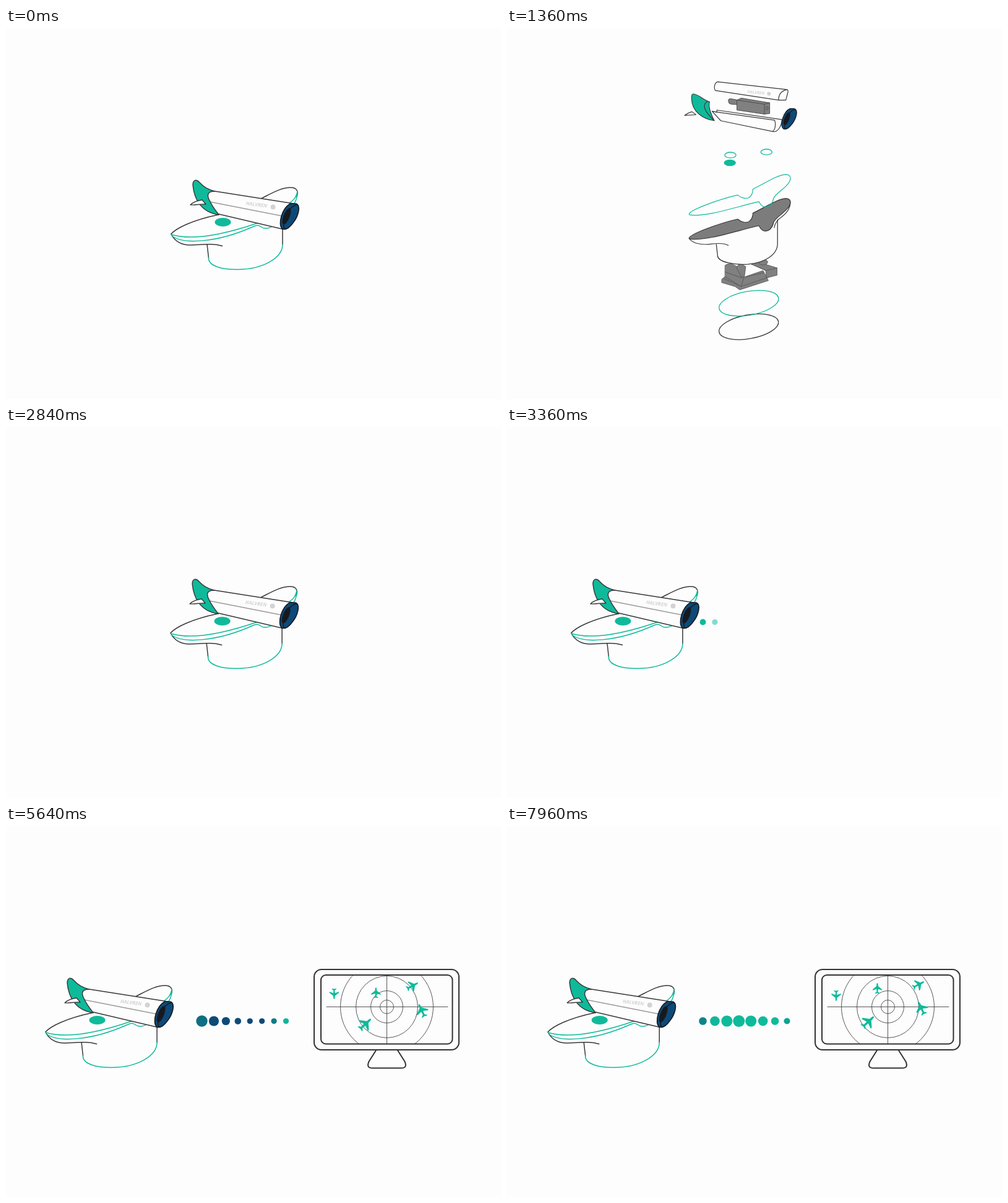
An HTML page with a canvas that plays this animation: 800 by 600 pixels, repeating every 8000 ms.

```html
<!DOCTYPE html>
<html lang="en">
<head>
<meta charset="utf-8">
<title>Exploded device and radar</title>
<style>
  html, body { margin: 0; width: 100%; height: 100%; overflow: hidden; background: #fdfdfd; }
  canvas { display: block; width: 100vw; height: 100vh; }
</style>
</head>
<body>
<canvas id="stage" width="800" height="600"></canvas>
<script>
const ctx = document.getElementById('stage').getContext('2d');
const LOOP = 8000, SMALL = 0.747;
const INK = '#38383a', TEAL = '#0fba9b', NAVY = '#0d4a78', GRAY = '#808080', WHITE = '#fdfdfd';
const TEAL_RGB = [15, 186, 155], NAVY_RGB = [13, 74, 120];

const clamp = v => Math.min(1, Math.max(0, v));
const lerp = (a, b, k) => a + (b - a) * k;
const mod = (v, n) => ((v % n) + n) % n;
const span = (t, start, length) => clamp((t - start) / length);
const ease = u => u < 0.5 ? 4 * u ** 3 : 1 - 4 * (1 - u) ** 3;
const smooth = u => u * u * (3 - 2 * u);
const mix = (a, b, k) => `rgb(${a.map((v, i) => Math.round(lerp(v, b[i], k))).join()})`;

function shape(d, fill, stroke, width = 1.1) {
  const path = typeof d === 'string' ? new Path2D(d) : d;
  if (fill) { ctx.fillStyle = fill; ctx.fill(path); }
  if (stroke) { ctx.strokeStyle = stroke; ctx.lineWidth = width; ctx.stroke(path); }
}

function oval(x, y, rx, ry = rx, turn = 0) {
  const path = new Path2D();
  path.ellipse(x, y, rx, ry, turn, 0, Math.PI * 2);
  return path;
}

function label(x, y, size, turn, markX, markY, markR) {
  ctx.save();
  ctx.translate(x, y);
  ctx.rotate(turn);
  ctx.font = `italic bold ${size}px "Open Sans", sans-serif`;
  ctx.fillStyle = '#d3d3d5';
  ctx.fillText('HALVREN', 0, 0);
  ctx.restore();
  shape(oval(markX, markY, markR), '#d3d3d5');
}

// Nose is drawn at full size; the other loose parts at the exploded size.
function nose() {
  shape('M447 325C438 318 447 289 460 284L468 284C478 286 472 305 464 315C459 322 453 327 447 325Z', NAVY, '#15181e', 1.6);
  shape('M469 286C457 289 445 313 450 325', null, '#15181e', 1.4);
  shape(oval(453.5, 304.5, 5, 14, 0.38), '#17191f');
}

function tail() {
  shape('M299 92C308 92 312 100 324 104C322 110 325 120 331 132C316 130 297 120 297 98C297 94 298 92 299 92Z', TEAL, INK);
  shape('M321 103C312 108 316 118 331 132', null, INK);
}

function wing() {
  shape('M284 126Q289 122 295 120.5L301 125Z', WHITE, INK);
}

function topShell() {
  shape('M343 69L445 80Q449 80 448 84L445 96L434 96L339 82C336 78 338 69 343 69Z', WHITE, INK);
  shape('M434 96C434 88 438 82 447 80', null, INK);
  label(387, 85.5, 6, 0.09, 419.5, 86.5, 2.9);
}

function bottomShell() {
  shape('M333 120L340 121L340 118L438 132C437 143 431 152 424 150L346 134Z', WHITE, INK);
  shape('M333 120L427 133C429 139 428 147 424 150', null, INK);
}

function motor() {
  shape('M375 100L364 98Q360 98 361 102Q361 105 364 106L375 107Z', GRAY, '#4a4a4a', 0.9);
  shape('M374 100L380 97L423 104L423 120L415 121L374 115Z', GRAY, '#4a4a4a', 0.9);
  shape('M374 100L415 106L423 104M415 106L415 121', null, '#4a4a4a', 0.9);
  shape(oval(419, 112, 1.7, 2.6), null, '#4a4a4a', 0.8);
}

const BRIM = 'M302 342C302 336 345 320 375 313C381 318 388 319 392 317C396 314 398 309 398 304' +
  'C415 296 434 283 447 282C458 282 455 292 449 298C443 305 432 311 429 318' +
  'C428 325 423 331 416 331C410 330 409 326 407 323C375 330 330 346 304 343Q302 343 302 342Z';

function hat(lid) {
  shape('M302 342C308 351 325 352 343 351L345 369C347 378 370 382 390 381C415 379 435 367 435 350' +
    'L435 314C447 307 455 298 454 286L400 304Z', WHITE);
  shape('M343 351L345 369C347 378 370 382 390 381C415 379 435 367 435 350L435 314', null, INK, 1.2);
  shape('M302 342C308 351 325 352 335 350.5C347 349 355 349 361 352.5', null, INK);
  shape('M454 286C455 295 450 303 441 310C435 314 431 319 430 326', null, INK);
  shape(BRIM, mix([253, 253, 253], [124, 124, 124], lid), INK);
}

function trim() {
  ctx.translate(0, -50);
  shape(BRIM, null, TEAL);
}

function electronics() {
  [
    'M351 422L357 417L381 420L413 409L421 424L378 438L371 433L351 427Z',
    'M356 401Q363 396 372 402L381 407L384 420L380 433L356 418Z',
    'M373 404L378 398L387 403L385 418L381 419Z',
    'M395 399L405 396L434 405L434 416L418 420L417 409Z'
  ].forEach(d => shape(d, GRAY, '#555', 0.8));
  shape('M356 411L381 420M380 433L421 419M354 421L378 432M395 399L417 409L434 405M386 419L414 412', null, '#555', 0.8);
  shape('M406 396C407 390 418 390 420 396C420 402 406 402 406 396Z', GRAY, '#555', 0.8);
}

const floorRing = (y, color) => () => shape(oval(391.5, y, 45.3, 17.9, -0.175), null, color, 1.2);
const ringDot = (x, y) => () => shape(oval(x, y, 8.5, 4.2), null, TEAL, 1.2);

// home: anchor when assembled, away: anchor when exploded, turn: tilt when assembled
const PARTS = [
  { home: [388.6, 365], away: [392, 517], draw: floorRing(517, INK) },
  { home: [388.6, 365], away: [391.5, 468], draw: floorRing(468, TEAL) },
  { home: [390, 342], away: [393, 415], draw: electronics },
  { home: [267, 334], away: [302, 342], draw: hat },
  { home: [267, 334], away: [302, 292], draw: trim },
  { home: [350.5, 314], away: [363, 190.5], draw: () => shape(oval(363, 190.5, 9, 4.9), TEAL) },
  { home: [350.5, 314], away: [364, 174.5], draw: ringDot(364, 174.5) },
  { home: [424, 302], away: [418, 171.5], draw: ringDot(418, 171.5) },
  { home: [344, 301], away: [346, 134], turn: 0.03, upper: true, draw: bottomShell },
  { home: [398, 292], away: [399, 110], turn: 0.04, upper: true, draw: motor },
  { home: [329, 281], away: [339, 82], turn: 0.048, upper: true, draw: topShell },
  { home: [307, 246], away: [300, 92], upper: true, draw: tail },
  { home: [298, 286], away: [284, 126], upper: true, draw: wing },
  { home: [459, 305], away: [456, 130.5], upper: true, fullSize: true, draw: nose }
];

function exploded(high, low) {
  const scale = lerp(1, SMALL, low);
  for (const { home, away, turn = 0, upper, fullSize, draw } of PARTS) {
    const k = upper ? high : low;
    const own = fullSize ? home : away;
    const size = fullSize ? scale : scale / SMALL;
    ctx.save();
    ctx.translate(lerp(home[0], away[0], low), lerp(home[1], away[1], k));
    ctx.rotate(turn * (1 - k));
    ctx.scale(size, size);
    ctx.translate(-own[0], -own[1]);
    draw(clamp(low * 5));
    ctx.restore();
  }
}

function assembled() {
  const w = 1.5;
  // cap
  shape('M267 333C275 324 300 311 343 302L414 275C430 267 445 258 460 258C470 258 473 264 470 273', null, INK, w);
  shape('M267 333C272 345 285 352 300 351C320 350 335 348 349.5 352.5', null, INK, w);
  shape('M325 350L327.5 372M447 350L447 322', null, INK, w);
  shape('M327.5 371C326 385 350 391 375 390.5C415 390 447 372 447 350', null, TEAL, w);
  shape('M267 334C300 344 350 335 408 315', null, TEAL, w);
  shape('M268 336C285 350 340 348 400 321C406 318 409 319 413 322C420 327 428 322 435 319', null, TEAL, w);
  shape('M471 264C469 275 464 279 458 283M471 268C470 276 468 281 465 285', null, TEAL, w);
  shape(oval(350.5, 314, 13, 7), TEAL);
  // fuselage
  shape('M338 264L465 284L446 325L344 301C335 292 326 280 326 270Q327 263 338 264Z', WHITE);
  shape('M329 281L446 304', null, '#9a9a9a', 1.3);
  shape('M336 263.7L465 284M344 301L446 325', null, INK, w);
  shape('M302 254C302 245 308 244 313 250C320 258 329 262 337 264C326 264 324 270 329 279' +
    'C333 288 340 297 344 302C314 298 304 275 302 254Z', TEAL, INK, w);
  shape('M298 286C303 281 310 279 317 278L323 285C315 284 306 287 298 286Z', WHITE, INK, 1.3);
  label(387.5, 286, 8, 0.13, 431.5, 289.5, 4);
  nose();
}

function device(t) {
  const back = t < 2340 ? 1 : 1 - ease(span(t, 2340, 360));
  const high = ease(span(t, 400, 1350)) * back;
  const low = ease(span(t, 520, 1360)) * back;
  const x = -203 * ease(span(t, 2740, 980)) + 2.2 * span(t, 7560, 400) ** 2;
  ctx.save();
  ctx.translate(x, 0);
  if (high < 0.003) assembled();
  else exploded(high, low);
  ctx.restore();
}

function signal(t) {
  const run = (t - 4560) * 0.00935;
  for (let i = 0; i < 8; i++) {
    const show = span(t, 3193 + 107 * i, 120);
    if (!show) continue;
    const far = Math.abs(mod(i - 7 - run + 8.95, 17.9) - 8.95);
    const r = 4.6 + (far < 5 ? 2.45 * (1 + Math.cos(Math.PI * far / 5)) : 0);
    // teal band, 7.5 dots wide, in a cycle of 13.9
    const off = Math.abs(mod(i + 0.25 - run + 6.95, 13.9) - 6.95);
    const navy = smooth(clamp((off - 3.75) / 2.4 + 0.5));
    ctx.globalAlpha = show;
    shape(oval(316.5 + 136 / 7 * i, 315.5, r), mix(TEAL_RGB, NAVY_RGB, navy));
  }
  ctx.globalAlpha = 1;
}

const PLANE = 'M0 -10C1.4 -10 1.6 -7 1.6 -4L9 2L9 4L1.6 1.5L1.2 6.5L4.2 9L4.2 10.2L0 9.3' +
  'L-4.2 10.2L-4.2 9L-1.2 6.5L-1.6 1.5L-9 4L-9 2L-1.6 -4C-1.6 -7 -1.4 -10 0 -10Z';

// x and y at 4560 ms, drift in px per second, heading in degrees, size
const PLANES = [
  [529.5, 270, 0.75, 1.3, 180, 0.85],
  [597.5, 273, 0.3, -3.1, 0, 0.85],
  [653, 259.5, 3.6, -0.9, 62, 1],
  [673, 300, -1, -1.6, -25, 1.1],
  [579.5, 322, 1.3, -1.6, 47, 1.2]
];

function roundBox(x, y, w, h, r) {
  const path = new Path2D();
  path.roundRect(x, y, w, h, r);
  return path;
}

function monitor(t) {
  const show = span(t, 3600, 300);
  if (!show) return;
  const screen = roundBox(509, 241, 212.5, 111.5, 8);
  ctx.save();
  ctx.globalAlpha = show;
  shape(roundBox(498, 232, 234, 130, 12), null, '#333', 2);
  shape('M598.5 362L586.5 381Q582 391.5 592 391.5L639 391.5Q649 391.5 644.5 381L632.5 362', null, '#333', 2);
  ctx.save();
  ctx.clip(screen);
  for (const r of [11, 26, 50, 75]) shape(oval(615.5, 292.5, r), null, '#444', 0.9);
  shape('M518 292.5H714M615.5 241V352', null, '#444', 0.9);
  for (const [x, y, vx, vy, heading, size] of PLANES) {
    const s = (t - 4560) / 1000;
    ctx.save();
    ctx.translate(x + vx * s, y + vy * s);
    ctx.rotate(heading * Math.PI / 180);
    ctx.scale(size, size);
    shape(PLANE, TEAL);
    ctx.restore();
  }
  ctx.restore();
  shape(screen, null, '#333', 2);
  ctx.restore();
}

const begin = performance.now();

function frame() {
  const t = mod(performance.now() - begin, LOOP);
  ctx.fillStyle = WHITE;
  ctx.fillRect(0, 0, 800, 600);
  ctx.lineJoin = ctx.lineCap = 'round';
  device(t);
  signal(t);
  monitor(t);
  requestAnimationFrame(frame);
}
frame();
</script>
</body>
</html>
```
